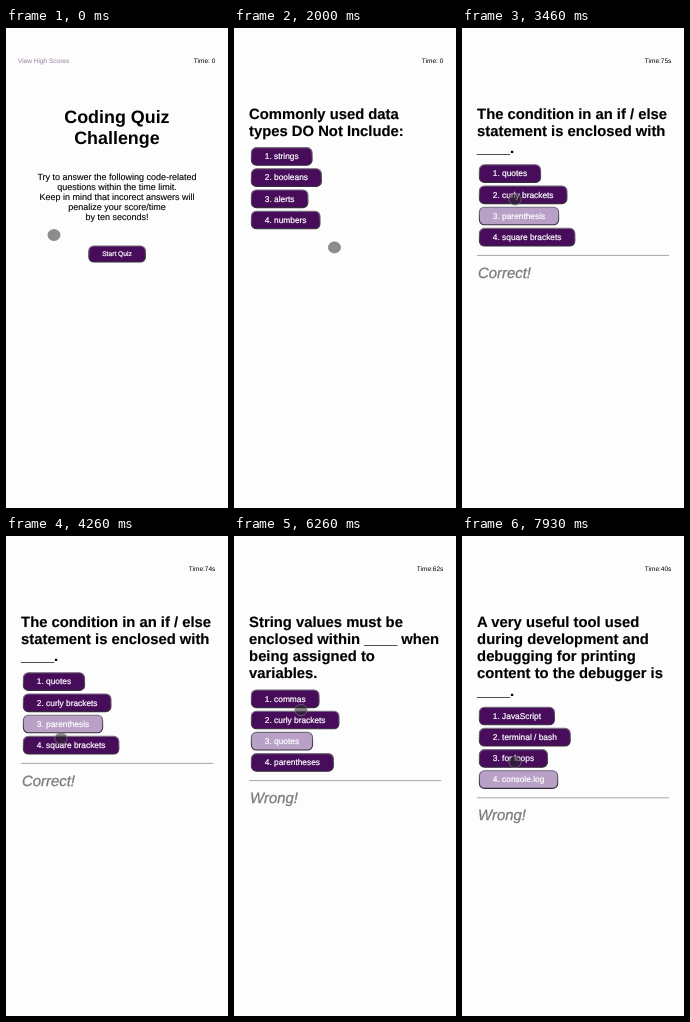
An HTML page that plays this animation: 222 by 480 pixels, repeating every 8000 ms.

```html
<!DOCTYPE html>
<html lang="en">
<head>
<meta charset="utf-8">
<title>Coding Quiz</title>
<style>
  html, body { margin: 0; width: 100%; height: 100%; overflow: hidden; background: #fdfdfd; }
  svg { display: block; width: 100%; height: 100%; font-family: "Liberation Sans", Arial, Helvetica, sans-serif; }
  text { white-space: pre; text-rendering: geometricPrecision; }
  .small { font-size: 6.5px; }
  .link { fill: #a393b0; stroke: #a393b0; stroke-width: .1px; }
  .title { font-size: 17.9px; font-weight: bold; text-anchor: middle; }
  .intro { font-size: 9px; text-anchor: middle; stroke: #000; stroke-width: .12px; }
  .question { font-size: 14.8px; font-weight: bold; stroke: #000; stroke-width: .15px; }
  .label { font-size: 8.35px; fill: #fff; stroke: #fff; stroke-width: .22px; }
  .start { font-size: 6.7px; text-anchor: middle; }
  .button { fill: #470d5b; stroke: url(#bevel); stroke-width: 1.1px; }
  .chosen { fill: #b8a0c6; }
  .rule { fill: #a8a8a8; }
  .result { font-size: 14.9px; font-style: italic; fill: #7c7c7c; stroke: #7c7c7c; stroke-width: .3px; }
  .cursor { fill: rgba(40, 40, 40, .53); stroke: rgba(125, 125, 125, .65); stroke-width: 1px; }
</style>
</head>
<body>
<svg id="stage" viewBox="0 0 222 480" preserveAspectRatio="none">
  <linearGradient id="bevel" x1="0" y1="0" x2="0" y2="1">
    <stop offset=".1" stop-color="#766c7c"/>
    <stop offset=".9" stop-color="#352c3a"/>
  </linearGradient>
</svg>
<script>
const LOOP = 8000;
const LINE = 17.2;
const stage = document.getElementById('stage');

function add(parent, tag, attrs, content = '') {
  const node = document.createElementNS('http://www.w3.org/2000/svg', tag);
  for (const [key, value] of Object.entries(attrs)) node.setAttribute(key, value);
  node.textContent = content;
  return parent.appendChild(node);
}

const write = (parent, name, x, y, content) =>
  add(parent, 'text', { class: name, x, y }, content);

const box = (parent, name, x, y, width, height) =>
  add(parent, 'rect', { class: name, x, y, width, height, rx: 5 });

function startScreen() {
  const group = add(stage, 'g', {});
  write(group, 'small link', 12, 35.3, 'View High Scores');
  ['Coding Quiz', 'Challenge'].forEach((line, i) => write(group, 'title', 110.9, 94.8 + i * 21, line));
  [
    'Try to answer the following code-related',
    'questions within the time limit.',
    'Keep in mind that incorect answers will',
    'penalize your score/time',
    'by ten seconds!'
  ].forEach((line, i) => write(group, 'intro', 111, 151.8 + i * 10, line));
  box(group, 'button', 82.8, 218, 56.6, 16);
  write(group, 'label start', 111, 228.3, 'Start Quiz');
  return group;
}

function quizScreen({ lines, answers, chosen, result }) {
  const group = add(stage, 'g', {});
  const shift = (lines.length - 2) * LINE;
  lines.forEach((line, i) => write(group, 'question', 15.1, 90.7 + i * LINE, line));
  answers.forEach((answer, i) => {
    const middle = 128.4 + shift + i * 21.2;
    const label = write(group, 'label', 30.8, middle + 2.8, `${i + 1}. ${answer}`);
    const width = label.getComputedTextLength() + 26.8;
    const name = i + 1 === chosen ? 'button chosen' : 'button';
    group.insertBefore(box(group, name, 17.4, middle - 8.8, width, 17.6), label);
  });
  if (result) {
    add(group, 'rect', { class: 'rule', x: 15, y: 209.7 + shift, width: 192, height: 1 });
    write(group, 'result', 16, 232.4 + shift, result);
  }
  return group;
}

const quiz = [
  { at: 1730, lines: ['Commonly used data', 'types DO Not Include:'],
    answers: ['strings', 'booleans', 'alerts', 'numbers'] },
  { at: 3400, lines: ['The condition in an if / else', 'statement is enclosed with', '____.'],
    answers: ['quotes', 'curly brackets', 'parenthesis', 'square brackets'],
    chosen: 3, result: 'Correct!' },
  { at: 4930, lines: ['Arrays in JavaScript can', 'be used to store ____.'],
    answers: ['numbers and strings', 'other arrays', 'booleans', 'all of the above'],
    chosen: 4, result: 'Wrong!' },
  { at: 6060, lines: ['String values must be', 'enclosed within ____ when', 'being assigned to', 'variables.'],
    answers: ['commas', 'curly brackets', 'quotes', 'parentheses'],
    chosen: 3, result: 'Wrong!' },
  { at: 7660, lines: ['A very useful tool used', 'during development and', 'debugging for printing', 'content to the debugger is', '____.'],
    answers: ['JavaScript', 'terminal / bash', 'for loops', 'console.log'],
    chosen: 4, result: 'Wrong!' }
];

const screens = [
  { at: 0, group: startScreen() },
  ...quiz.map(item => ({ at: item.at, group: quizScreen(item) }))
];

// The clock ticks once a second; wrong answers cost ten at the next tick.
const ticks = [' 0', '75s', '74s', '73s', '62s', '51s', '40s'];
const clock = add(stage, 'text', { class: 'small', x: 209.3, y: 35.3, 'text-anchor': 'end' });
const cursor = add(stage, 'ellipse', { class: 'cursor', rx: 6.1, ry: 5.6 });

// time, x, y
const path = [
  [0, 48, 207], [60, 48, 207], [800, 112.3, 231.5], [1800, 112.3, 231.5],
  [2500, 53, 171], [3400, 53, 171], [4260, 55, 202.5], [4500, 56, 209],
  [4930, 56, 209], [5330, 57, 214], [5900, 64, 171], [6060, 65, 171],
  [6260, 67, 174], [7100, 53, 226], [LOOP, 53, 226]
];

const ease = p => p * p * (3 - 2 * p);

function cursorAt(time) {
  const next = path.findIndex(point => point[0] > time);
  const [t0, x0, y0] = path[next - 1];
  const [t1, x1, y1] = path[next];
  const p = ease((time - t0) / (t1 - t0));
  return [x0 + (x1 - x0) * p, y0 + (y1 - y0) * p];
}

function draw(now) {
  const time = now % LOOP;
  const current = screens.findLast(screen => screen.at <= time);
  for (const screen of screens) {
    screen.group.setAttribute('visibility', screen === current ? 'visible' : 'hidden');
  }
  clock.textContent = 'Time:' + ticks[Math.max(0, Math.floor((time - 1800) / 1000))];
  const [x, y] = cursorAt(time);
  cursor.setAttribute('cx', x);
  cursor.setAttribute('cy', y);
}

const begin = performance.now();
function frame() {
  draw(performance.now() - begin);
  requestAnimationFrame(frame);
}
frame();
</script>
</body>
</html>
```
